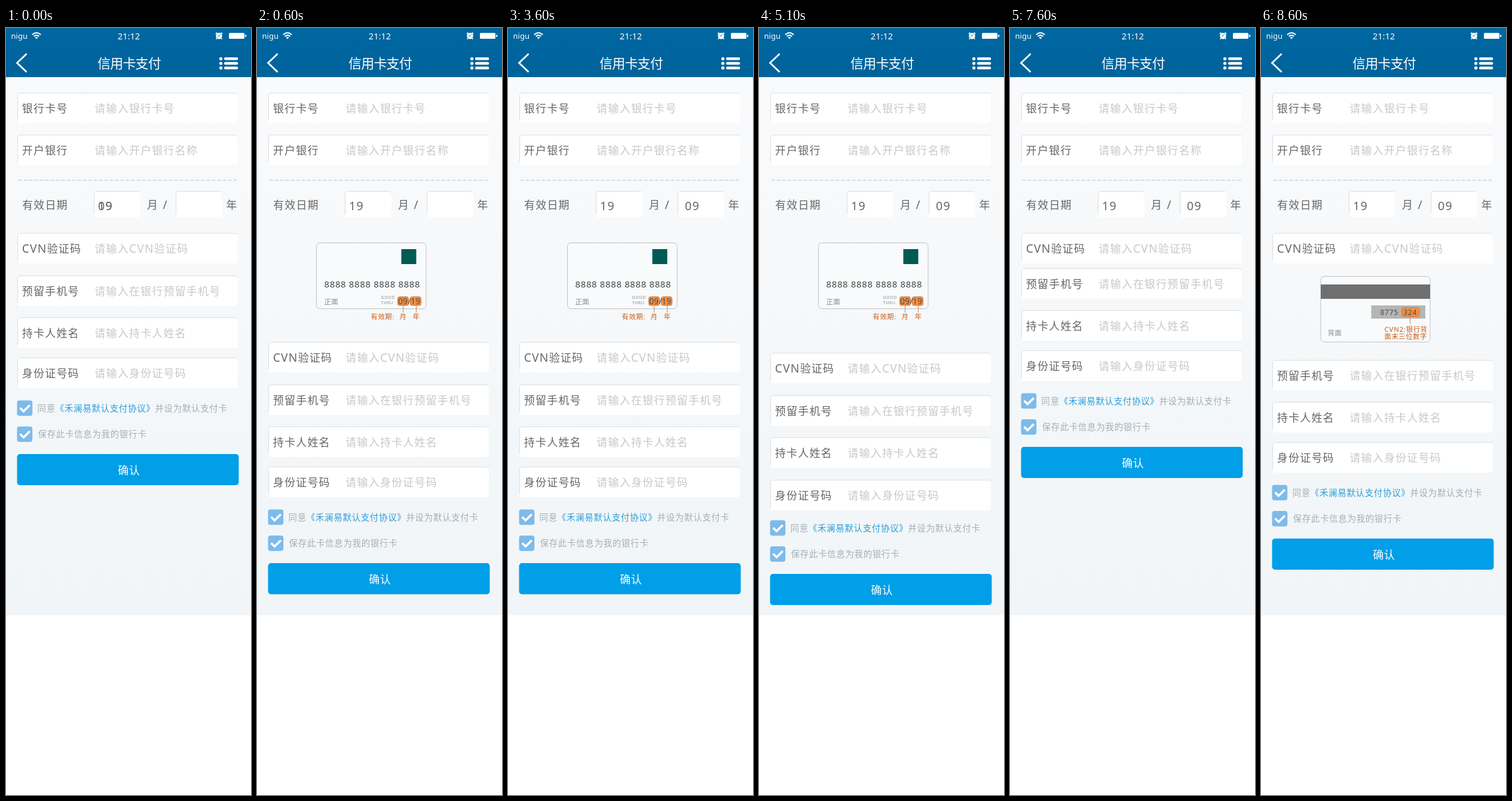
Animation of 410 by 1280 pixels, one loop 9100 ms. Source, as an HTML page:

```html
<!DOCTYPE html>
<html lang="zh-CN">
<head>
<meta charset="utf-8">
<title>信用卡支付</title>
<style>
html, body { margin: 0; width: 100%; height: 100%; overflow: hidden; background: #fff; }
svg { display: block; width: 100%; height: 100%; }
text { font-family: "Noto Sans", "Noto Sans CJK SC", "Noto Sans CJK JP", sans-serif; white-space: pre; }
.label, .hint { font-size: 18px; letter-spacing: 1.2px; fill: #666; }
.hint { fill: #c8c8c8; }
.latin { font-size: 19.2px; }
.digits { font-size: 19.6px; letter-spacing: 1.2px; fill: #666; }
.note { font-size: 14.5px; letter-spacing: .65px; fill: #a2b0b7; }
.link { fill: #2a9fdc; }
.side { font-size: 11.5px; letter-spacing: .3px; fill: #8a8a8a; }
.tip { font-size: 11.3px; letter-spacing: .6px; fill: #cc5a14; }
.tiny { font-size: 7px; letter-spacing: .6px; fill: #8a8a8a; }
.plate { fill: #f8fafc; stroke: #bdbfc1; }
.mark { fill: #ee9048; stroke: #d9752f; }
.lead { stroke: #c98a60; }
.white { fill: #fff; }
.line { fill: none; stroke: #fff; }
</style>
</head>
<body>
<svg viewBox="0 0 410 1280">
  <defs>
    <linearGradient id="page" x1="0" y1="0" x2="0" y2="1">
      <stop offset="0" stop-color="#f9fafc"/>
      <stop offset="1" stop-color="#f1f5f7"/>
    </linearGradient>
    <linearGradient id="bar" x1="0" y1="0" x2="0" y2="1">
      <stop offset="0" stop-color="#0067a1"/>
      <stop offset="1" stop-color="#00639b"/>
    </linearGradient>
  </defs>

  <rect y="80" width="410" height="900" fill="url(#page)"/>
  <rect width="410" height="82" fill="url(#bar)"/>

  <!-- status bar -->
  <text class="white" x="8.5" y="17.5" font-size="13">nigu</text>
  <g class="line" stroke-width="2">
    <path d="M43.8 11.2 Q51 4.8 58.2 11.2"/>
    <path d="M46.6 14 Q51 10.2 55.4 14"/>
  </g>
  <path class="white" d="M48.6 16 Q51 14 53.4 16 L51 18.6Z"/>
  <text class="white" x="205.5" y="18.5" font-size="14.6" text-anchor="middle">21:12</text>
  <circle class="white" cx="356.5" cy="13.2" r="5.2"/>
  <path class="line" stroke-width="1.6" d="M350.8 10 L353.4 7.6 M362.2 10 L359.6 7.6 M353 17 L351.6 18.6 M360 17 L361.4 18.6"/>
  <path d="M358.6 10.6 L356.5 13.4 H354" fill="none" stroke="#0067a1"/>
  <rect class="white" x="373" y="8.3" width="26" height="9.6" rx="1.5"/>
  <rect class="white" x="400" y="11.2" width="2.2" height="3.8" rx="1"/>

  <!-- title bar -->
  <path class="line" stroke-width="2.8" d="M34.5 43 L18.5 58.3 L34.5 73.5"/>
  <text class="white" x="153" y="66.5" font-size="22" letter-spacing="-.8">信用卡支付</text>
  <g id="menu" class="white"></g>

  <g id="bankNo"></g>
  <g id="bankName"></g>
  <path d="M20.5 254 H387" stroke="#d8dbde" stroke-width="1.8" stroke-dasharray="6 3"/>

  <!-- expiry date -->
  <g id="expiry"></g>
  <text class="label" x="27" y="302.3">有效日期</text>
  <text class="label" x="236" y="302.3">月</text>
  <text class="label latin" x="262.5" y="302.3">/</text>
  <text class="label" x="368.5" y="302.3">年</text>
  <text class="digits" id="m19" x="154" y="304">19</text>
  <text class="digits" id="m09" x="154" y="304">09</text>
  <text class="digits" id="y19" x="296" y="304">19</text>
  <text class="digits" id="y09" x="296" y="304">09</text>

  <!-- card hints -->
  <g id="front">
    <rect class="plate" x="99.5" y="358.5" width="183.5" height="110" rx="6"/>
    <rect x="241.5" y="369" width="25" height="25" fill="#005a54"/>
    <text x="112.5" y="432.7" font-size="15" letter-spacing=".62" fill="#444">8888 8888 8888 8888</text>
    <text class="side" x="112.5" y="461.3">正面</text>
    <text class="tiny" x="207.5" y="451.8">GOOD</text>
    <text class="tiny" x="207.5" y="460.8">THRU</text>
    <rect class="mark" x="235.5" y="448.5" width="18" height="14.5" rx="3"/>
    <rect class="mark" x="256.5" y="448.5" width="18" height="14.5" rx="3"/>
    <g font-size="13.5" letter-spacing=".3" fill="#4c4c4c">
      <text x="236.3" y="461">09</text>
      <text x="252.4" y="461">/</text>
      <text x="257.3" y="461">19</text>
    </g>
    <path class="lead" d="M244.5 463.5 V475 M266.5 463.5 V475"/>
    <text class="tip" x="190.5" y="486.3">有效期:</text>
    <text class="tip" x="238.5" y="486.3">月</text>
    <text class="tip" x="260.8" y="486.3">年</text>
  </g>
  <g id="back">
    <rect class="plate" x="100" y="414.5" width="183" height="109.5" rx="6"/>
    <rect x="100" y="428" width="183" height="24" fill="#706f6f"/>
    <rect x="184.5" y="463" width="90.5" height="22" fill="#b5b5b5"/>
    <rect class="mark" x="235.5" y="466.5" width="29.5" height="15" rx="3"/>
    <g font-size="12" letter-spacing=".7" fill="#4c4c4c">
      <text x="199.5" y="478.5">8775</text>
      <text x="238.3" y="478.5">324</text>
    </g>
    <path class="lead" d="M249.5 482 V494"/>
    <text class="side" x="111.5" y="513.3">背面</text>
    <text class="tip" x="206.5" y="506.5"><tspan letter-spacing=".9">CVN2:</tspan>银行背</text>
    <text class="tip" x="206.5" y="518.6">面末三位数字</text>
  </g>

  <!-- moving fields -->
  <g id="cvn"></g>
  <g id="rest">
    <g id="phone"></g>
    <g id="holder"></g>
    <g id="idNo"></g>
    <g id="checks"></g>
    <text class="note" x="52.5" y="639.6">同意<tspan class="link">《禾澜易默认支付协议》</tspan>并设为默认支付卡</text>
    <text class="note" x="53.5" y="683.4">保存此卡信息为我的银行卡</text>
    <rect x="18.5" y="711" width="371" height="52" rx="5" fill="#009fe8"/>
    <text class="white" x="187.3" y="744.5" font-size="18" letter-spacing=".5">确认</text>
  </g>
</svg>
<script>
const LOOP = 9100;
const $ = id => document.getElementById(id);
const add = (id, html) => $(id).insertAdjacentHTML('beforeend', html);

const box = (x, y, w, h) => `
  <rect x="${x}" y="${y}" width="${w}" height="${h}" rx="4.5" fill="#fff"/>
  <path d="M${x + .5} ${y + h - 5} V${y + 5} q0 -4.5 4.5 -4.5 H${x + w - 4.5} q3 0 4 2.5"
    fill="none" stroke="#dadcdd"/>`;

// Latin runs are set slightly larger than the Chinese characters
const mixed = s => s.replace(/[A-Z]+/g, '<tspan class="latin">$&</tspan>');

const field = (id, y, label, hint) => add(id, box(19, y, 369, 51) + `
  <text class="label" x="26.8" y="${y + 33}">${mixed(label)}</text>
  <text class="hint" x="148.3" y="${y + 33}">${mixed(hint)}</text>`);

field('bankNo', 108, '银行卡号', '请输入银行卡号');
field('bankName', 178, '开户银行', '请输入开户银行名称');
field('cvn', 342, 'CVN验证码', '请输入CVN验证码');
field('phone', 413, '预留手机号', '请输入在银行预留手机号');
field('holder', 483, '持卡人姓名', '请输入持卡人姓名');
field('idNo', 550, '身份证号码', '请输入身份证号码');
add('expiry', box(147, 272, 78, 44) + box(284, 272, 78, 44));

for (const y of [51.3, 59, 66.7]) add('menu', `
  <circle cx="359.6" cy="${y}" r="2.6"/>
  <rect x="365" y="${y - 2.3}" width="23.3" height="4.6" rx="2"/>`);

for (const y of [621.5, 665]) add('checks', `
  <rect x="18.5" y="${y}" width="25.7" height="25.7" rx="4" fill="#7dbbea"/>
  <path class="line" stroke-width="3.6" d="M23.6 ${y + 12.5} l5.8 5.8 l10.4 -10.4"/>`);

// time, shift of the CVN field, shift of the rest, extra shift of the ID field, visible parts
const steps = [
  [0, 0, 0, 0, 'm19 m09'],
  [100, -12, -12, 0, 'm19'],
  [600, 182, 182, 0, 'm19 front'],
  [2100, 182, 182, 0, 'm09 y19 front'],
  [3600, 182, 182, 0, 'm19 y09 front'],
  [5100, 200, 200, 4, 'm19 y09 front'],
  [6600, -13, -13, 3, 'm19 y09'],
  [7100, 0, 0, 0, 'm19 y09'],
  [7600, 0, -12, 0, 'm19 y09'],
  [8100, 0, 156, 0, 'm19 y09 back'],
  [8600, 0, 141, 0, 'm19 y09 back']
];

function play(id, prop, value) {
  const frames = steps.map(s => ({ offset: s[0] / LOOP, [prop]: value(s), easing: 'step-end' }));
  frames.push({ ...frames[frames.length - 1], offset: 1 });
  $(id).animate(frames, { duration: LOOP, iterations: Infinity });
}

['cvn', 'rest', 'idNo'].forEach((id, i) =>
  play(id, 'transform', s => `translateY(${s[i + 1]}px)`));
for (const id of ['m19', 'm09', 'y19', 'y09', 'front', 'back'])
  play(id, 'opacity', s => s[4].split(' ').includes(id) ? 1 : 0);
</script>
</body>
</html>
```
